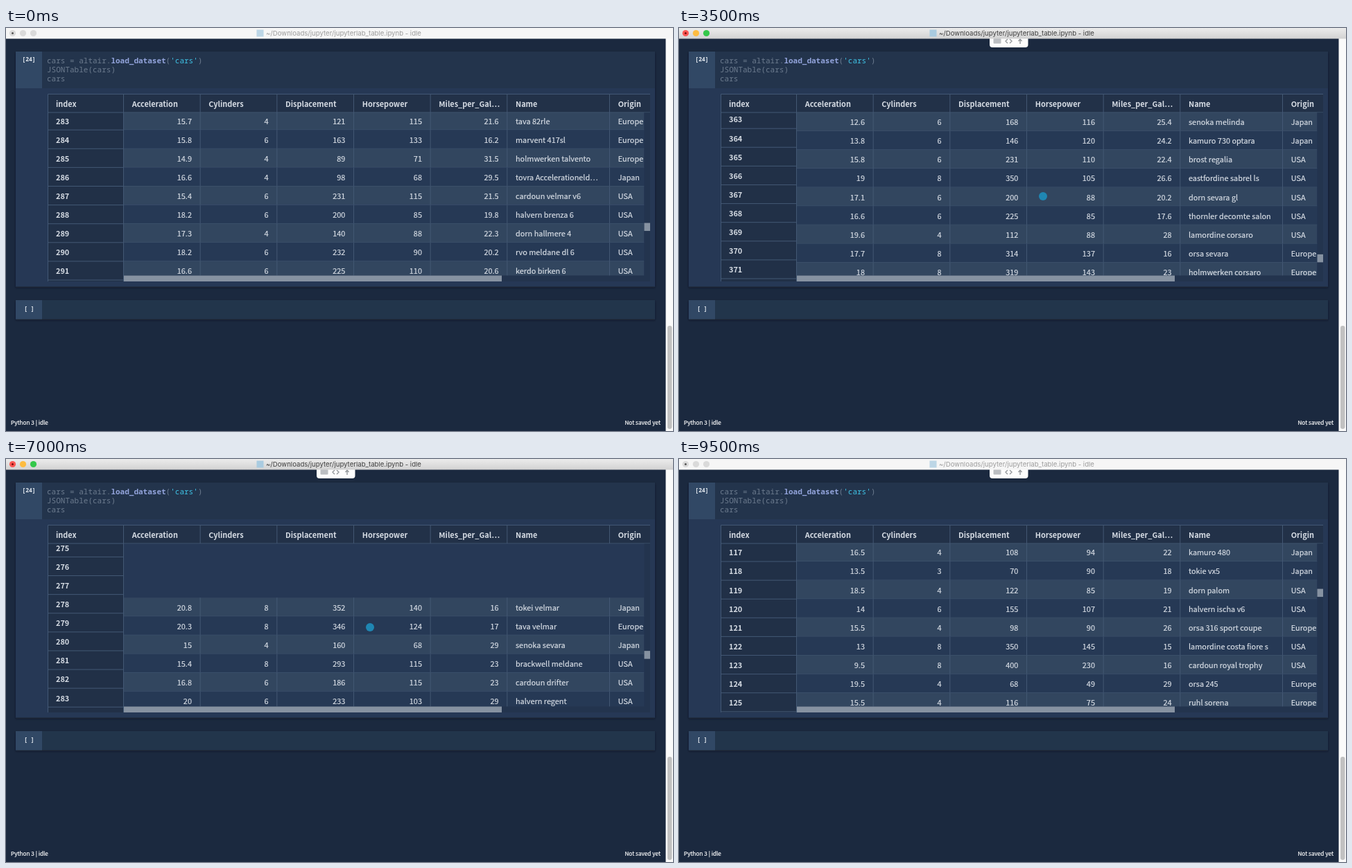
An HTML page for the animation above (9750 ms loop, 962 by 582 pixels).

```html
<!DOCTYPE html>
<html lang="en">
<head>
<meta charset="utf-8">
<title>Notebook table</title>
<style>
  html, body { margin: 0; width: 100%; height: 100%; overflow: hidden; background: #1b293f; }
  svg { display: block; }
  svg svg { overflow: hidden; }
  text { font: 500 10.9px "Noto Sans CJK JP", "Noto Sans CJK SC", "Noto Sans CJK", "Noto Sans", sans-serif; fill: #d6dce4; stroke: #d6dce4; stroke-width: .2; white-space: pre; }
  .b { font-weight: 700; stroke: none; }
  .code { font: 11px "Noto Sans Mono", monospace; fill: #6c7b8e; stroke: none; }
  .call { font-weight: 600; fill: #93a4dc; }
  .prompt { font: 600 8.1px "Noto Sans Mono", monospace; fill: #e8edf3; stroke: none; }
  .status { font-size: 8.2px; fill: #fff; stroke: #fff; }
  .title { font: 9.6px Inter, sans-serif; stroke: none; }
  .line { stroke: #435874; fill: none; }
</style>
</head>
<body>
<svg width="962" height="582" viewBox="0 0 962 582">
  <defs>
    <linearGradient id="chrome" x2="0" y2="1"><stop stop-color="#ececec"/><stop offset="1" stop-color="#d2d2d2"/></linearGradient>
    <filter id="shadow" x="-5%" y="-20%" width="110%" height="150%"><feDropShadow dx="0" dy="1.5" stdDeviation="1.5" flood-color="#0b1422" flood-opacity=".6"/></filter>
  </defs>
  <rect width="962" height="582" fill="#1b293f"/>
  <rect x="951.5" y="15" width="10.5" height="567" fill="#fafafa"/>
  <rect x="954" y="430" width="6.5" height="149" rx="3.2" fill="#c1c1c1"/>

  <rect x="14" y="34" width="922" height="339.5" fill="#263955" filter="url(#shadow)"/>
  <rect x="52" y="34" width="884" height="53" fill="#23344c"/>
  <rect x="14" y="34" width="38" height="53" fill="#314865"/>
  <text class="prompt" x="23.3" y="48">[24]</text>
  <text class="code" x="59" y="51.3">cars = altair.<tspan class="call">load_dataset</tspan>(<tspan fill="#3fc3e6">'cars'</tspan>)</text>
  <text class="code" x="59" y="64.2">JSONTable(cars)</text>
  <text class="code" x="59" y="77">cars</text>

  <rect x="14" y="393" width="922" height="27.5" fill="#23344c" filter="url(#shadow)"/>
  <rect x="14" y="393" width="38" height="27.5" fill="#314865"/>
  <text class="prompt" x="26" y="408">[ ]</text>
  <text class="status" x="7" y="573">Python 3 | idle</text>
  <text class="status" x="944" y="573" text-anchor="end">Not saved yet</text>

  <rect x="60" y="95" width="110" height="271" fill="#213047"/>
  <svg id="indexes" x="60" y="122" width="110" height="244"></svg>
  <svg id="cells" x="169.5" y="122" width="751" height="235.5"></svg>
  <svg id="header" x="169.5" y="95" width="759.5" height="27.5"></svg>
  <path class="line" d="M169.5 95.5H60.5V366M60 122H170M169.5 95V366"/>
  <text class="b" x="72" y="114">index</text>
  <path d="M170 357.5H920.5V122H929V366H170z" fill="#223249" opacity=".55"/>
  <rect id="thumbX" y="357.5" width="545" height="8.5" fill="#8692a1"/>
  <rect id="thumbY" x="920.5" width="8.5" height="11.5" fill="#8692a1"/>

  <g id="toolbar">
    <rect x="448" y="8" width="55.5" height="20" rx="4" fill="#fdfdfd"/>
    <rect x="453.5" y="15" width="11" height="7.5" rx="1" fill="#bbbec2"/>
    <path d="M474 16l-3 3 3 3M477 16l3 3-3 3M492 23V17M489.5 19l2.5-3 2.5 3" fill="none" stroke="#93979b" stroke-width="1.4"/>
  </g>
  <g id="titlebar"></g>
  <circle id="cursor" stroke-width="1.2"/>
</svg>
<script>
const LOOP = 9750, STEP = 250, ROW = 27.1, LAG = 125, MAX_X = 282;
const BASELINE = 18.4, PADDING = 12.2;
const $ = id => document.getElementById(id);

// Field order: columns below, without the year.
const columns = [
  ['Acceleration', 1], ['Cylinders', 1], ['Displacement', 1], ['Horsepower', 1], ['Miles_per_Gal…', 1],
  ['Name', 0], ['Origin', 0], ['Weight_in_lbs', 1], ['Year', 0]
];
let edge = 0;
for (const c of columns) {
  c.left = edge;
  c.right = edge += c[0] === 'Name' ? 147.7 : 110.66;
}

const rows = {};
function addRows(first, lines) {
  lines.trim().split('\n').forEach((line, i) => rows[first + i] = line.trim().split('|'));
}
addRows(117, `16.5|4|108|94|22|kamuro 480|Japan
  13.5|3|70|90|18|tokie vx5|Japan
  18.5|4|122|85|19|dorn palom|USA
  14|6|155|107|21|halvern ischa v6|USA
  15.5|4|98|90|26|orsa 316 sport coupe|Europe
  13|8|350|145|15|lamordine costa fiore s|USA
  9.5|8|400|230|16|cardoun royal trophy|USA
  19.5|4|68|49|29|orsa 245|Europe
  15.5|4|116|75|24|ruhl sorena|Europe`);
addRows(159, `16|6|225|95|19|brackwell hardy cust…|USA
  16|6|250|105|18|lamordine nebu|USA
  21|6|250|72|15|halvern regent|USA
  19.5|6|250|72|15|dorn drifter|USA
  11.5|8|400|170|16|cardoun marisela|USA
  14|8|350|145|15|lamordine val mar|USA
  14.5|8|318|150|16|brackwell high ire|USA`);
addRows(283, `15.7|4|121|115|21.6|tava 82rle|Europe
  15.8|6|163|133|16.2|marvent 417sl|Europe
  14.9|4|89|71|31.5|holmwerken talvento|Europe
  16.6|4|98|68|29.5|tovra Accelerationeld…|Japan
  15.4|6|231|115|21.5|cardoun velmar v6|USA
  18.2|6|200|85|19.8|halvern brenza 6|USA
  17.3|4|140|88|22.3|dorn hallmere 4|USA
  18.2|6|232|90|20.2|rvo meldane dl 6|USA
  16.6|6|225|110|20.6|kerdo birken 6|USA`);
addRows(329, `17.9|4|86|65|46.6|tokei rlc|Japan
  14.4|4|156|105|27.9|kerdo foal|USA
  19.2|4|85|65|40.8|kamuro 340|Japan
  21.7|4|90|48|44.3|hw badger c (diesel)|Europe
  23.7|4|90|48|43.4|hw strider (diesel)|Europe
  19.9|5|121|67|36.4|elvo 7000s (diesel)|Europe
  21.8|4|146|67|30|valdemar-rohn 310d|Europe
  13.8|4|91|67|44.6|tovra plaza 1300 gl|Japan
  17.3|4|85||40.9|gaultre petino deluxe|Europe`);
addRows(367, `15.4|4|121|110||tava 600s|Europe
  19.6|6|145|76|30.7|skarn diesel|Europe
  12.6|6|168|116|25.4|senoka melinda|Japan
  13.8|6|146|120|24.2|kamuro 730 optara|Japan
  15.8|6|231|110|22.4|brost regalia|USA
  19|8|350|105|26.6|eastfordine sabrel ls|USA
  17.1|6|200|88|20.2|dorn sevara gl|USA
  16.6|6|225|85|17.6|thornler decomte salon|USA
  19.6|4|112|88|28|lamordine corsaro|USA`);
addRows(378, `16.2|4|112|85|31|cardoun k3100 se hatch…|USA|2575
  16|4|135|84|29|kerdo lyra se|USA|2525
  18|4|151|90|27|cardoun griffin|USA|2735
  16.4|4|140|92|24|dorn hallmere novara|USA|2865
  20.5|4|151||23|rvo meldane dl|USA|3035
  15.3|4|105|74|36|holmwerken badger l|Europe|1980
  18.2|4|91|68|37|tokei rlc custom l|Japan|2025
  17.6|4|91|68|31|tokei rlc custom|Japan|1970
  14.7|4|105|63|38|brackwell meridan miner|USA|2125`);

const makers = 'dorn,lamordine,brackwell,kerdo,cardoun,rvo,halvern,tokei,kamuro,senoka,holmwerken,orsa,tava'.split(',');
const models = 'hallmere,corsaro,regent,birken,velmar,meldane,custom,brenza,sevara,drifter'.split(',');

// Seeded stand-in for rows without listed values.
function getRow(n) {
  if (rows[n]) return rows[n];
  const rnd = k => { const v = Math.sin(n * 12.99 + k * 78.23) * 43758.55; return v - Math.floor(v); };
  const int = (k, low, span) => low + Math.floor(rnd(k) * span);
  const size = int(1, 0, 3), maker = int(2, 0, makers.length);
  return rows[n] = [
    int(3, 120, 90) / 10, 4 + size * 2, int(4, 85 + size * 100, 80), int(5, 65 + size * 25, 35),
    int(6, 28 - size * 6, 8), `${makers[maker]} ${models[int(7, 0, models.length)]}`,
    maker < 7 ? 'USA' : maker < 10 ? 'Japan' : 'Europe', int(8, 2000 + size * 700, 600)
  ];
}

// [time, top row, power]: power > 1 speeds up, negative slows down.
const scrollKeys = [
  [1500, 283.07, 1], [2625, 322.74, 1.3], [2750, 328.97, 1], [3750, 378.37, -1.2], [5750, 378.37, 1],
  [5875, 375.15, 1], [6000, 367.45, 1], [7875, 169.95, 1], [8000, 156.92, 1], [9150, 117.04, -3]
];
function topRow(t) {
  const i = scrollKeys.findIndex(k => t <= k[0]);
  if (i === 0) return scrollKeys[0][1];
  if (i < 0) return scrollKeys.at(-1)[1];
  const [t0, from] = scrollKeys[i - 1], [t1, to, power] = scrollKeys[i];
  const u = (t - t0) / (t1 - t0);
  return from + (to - from) * (power > 0 ? u ** power : 1 - (1 - u) ** -power);
}

function scrollX(t) {
  if (t < 4000 || t >= 5500) return 0;
  return t < 4250 || t >= 5250 ? MAX_X / 2 : MAX_X;
}

const text = (x, y, s, attrs = '') => `<text x="${x}" y="${y}" ${attrs}>${s}</text>`;
const line = d => `<path class="line" d="${d}"/>`;

function drawIndexes(top) {
  let out = '';
  for (let n = Math.floor(top); n < top + 10; n++) {
    const y = (n - top) * ROW;
    out += line(`M0 ${y + ROW}H110`) + text(12, y + BASELINE, n, 'class="b"');
  }
  $('indexes').innerHTML = out;
}

function drawCells(top, shift, blank) {
  let out = '';
  for (let n = Math.floor(top) + blank; n < top + 9; n++) {
    const y = (n - top) * ROW;
    const values = [...getRow(n)];
    values[7] ??= 2400;
    values[8] = '1982-01-01';
    out += `<rect y="${y}" width="751" height="${ROW}" fill="${n % 2 ? '#32465f' : '#263955'}"/>` + line(`M0 ${y + ROW}H751`);
    columns.forEach((c, i) => {
      out += line(`M${c.right - shift} ${y}v${ROW}`) + (c[1]
        ? text(c.right - shift - PADDING, y + BASELINE, values[i], 'text-anchor="end"')
        : text(c.left - shift + PADDING, y + BASELINE, values[i]));
    });
  }
  $('cells').innerHTML = out;
}

function drawHeader(shift) {
  const end = edge - shift;
  $('header').innerHTML = `<rect width="${end}" height="27" fill="#223148"/>` + line(`M0 .5H${end}M0 27H${end}`) +
    columns.map(c => line(`M${c.right - shift} 0V27`) + text(c.left - shift + PADDING, 19, c[0], 'class="b"')).join('');
}

function drawTitle(active) {
  const lights = active ? ['#fc5753', '#fdbc40', '#34c84a'] : ['#dadada', '#dadada', '#dadada'];
  $('titlebar').innerHTML = `<rect width="962" height="15.5" fill="${active ? 'url(#chrome)' : '#f6f6f6'}"/>` +
    lights.map((c, i) => `<circle cx="${9.5 + i * 15}" cy="7.5" r="4.6" fill="${c}"/>`).join('') +
    `<circle cx="9.5" cy="7.5" r="1.5" fill="${active ? '#7a0d0a' : '#555'}"/>` +
    `<rect x="361.5" y="2.5" width="10" height="10" fill="#a9cbe0" opacity="${active ? 1 : .75}"/>` +
    text(487, 11.2, '~/Downloads/jupyter/jupyterlab_table.ipynb - idle', `class="title" text-anchor="middle" style="fill:${active ? '#3e3e3e' : '#9c9c9c'}"`);
}

function drawCursor(t) {
  const pressed = t >= 1750;
  const [x, y] = t < 500 ? [502, 60] : t < 750 ? [517, 150] : t < 1500 ? [525, 242] : pressed ? [525, 243] : [522, 258];
  const attrs = {
    cx: x, cy: y, r: pressed ? 6 : 7,
    fill: pressed ? '#1f86b2' : 'none', stroke: pressed ? 'none' : '#28618e',
    visibility: t >= 250 && t < 9500 ? 'visible' : 'hidden'
  };
  for (const k in attrs) $('cursor').setAttribute(k, attrs[k]);
}

function draw(t) {
  const top = topRow(t), indexTop = topRow(t - LAG), shift = scrollX(t);
  drawIndexes(indexTop);
  // Fast upward scrolling outruns the rendering of the first rows.
  drawCells(top, shift, Math.max(0, Math.round(indexTop - top - 10)));
  drawHeader(shift);
  drawTitle(t >= 1500 && t < 9500);
  drawCursor(t);
  $('toolbar').setAttribute('visibility', t < 250 ? 'hidden' : 'visible');
  $('thumbX').setAttribute('x', 170 + shift * 205.7 / MAX_X);
  $('thumbY').setAttribute('y', 281.5 + (indexTop - 283) * .566);
}

const start = performance.now();
let shown = -1;
function tick() {
  const t = Math.floor((performance.now() - start) % LOOP / STEP) * STEP;
  if (t !== shown) draw(shown = t);
  requestAnimationFrame(tick);
}
tick();
</script>
</body>
</html>
```
